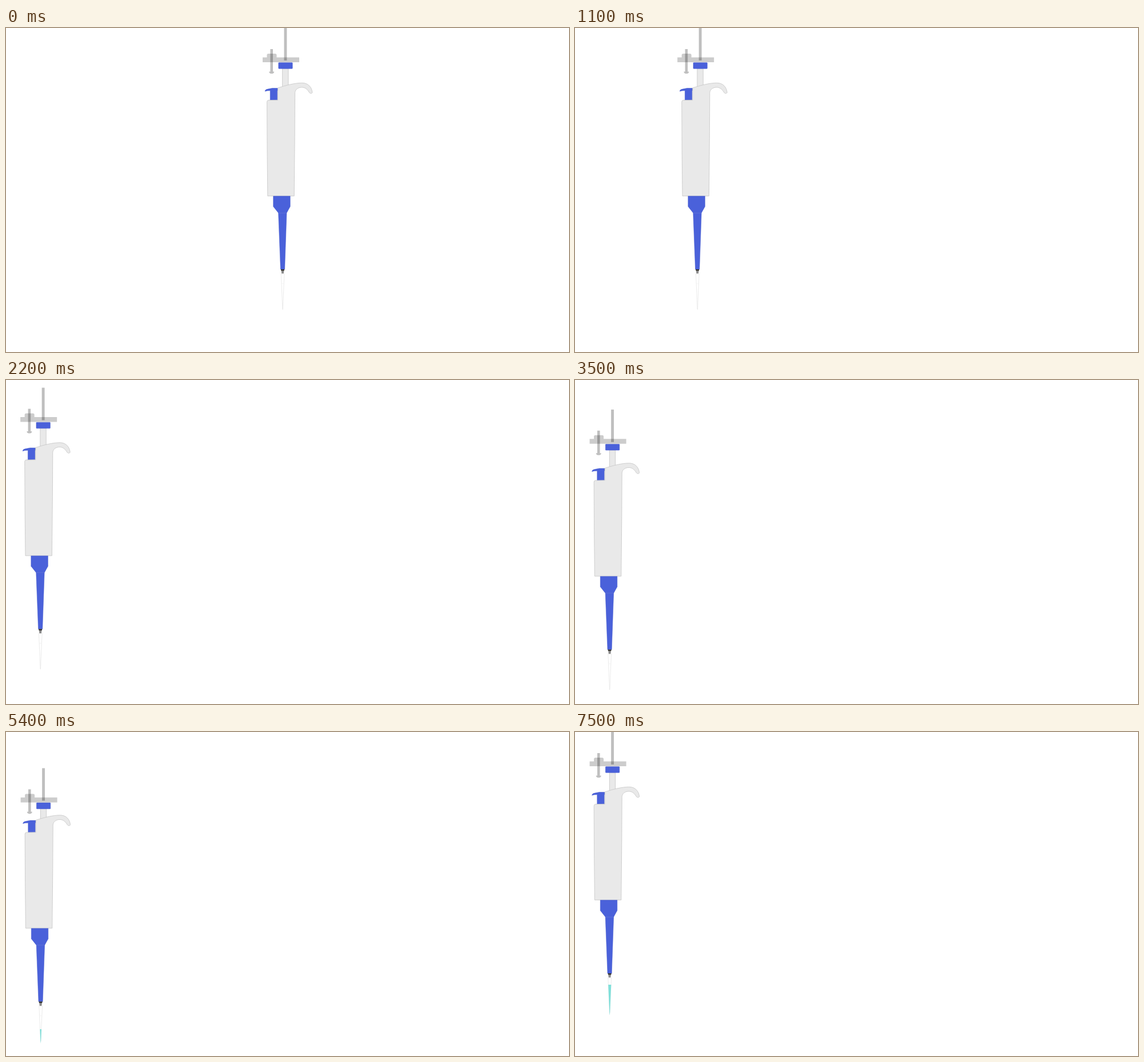
Animation of 985 by 568 pixels, one loop 8 s. Source, as an HTML page:

```html
<!DOCTYPE html>
<html lang="en">
<head>
<meta charset="utf-8">
<title>Pipette</title>
<style>
html, body { margin: 0; width: 100%; height: 100%; overflow: hidden; background: #fff; }
svg { display: block; width: 100%; height: 100%; }
.blue { fill: #4a61da; stroke: #3f55c8; stroke-width: .5; }
.shell { fill: #e9e9e9; stroke: #c6c6c6; stroke-width: .8; }
.plate { fill: #000; fill-opacity: .2; }
.rod { fill: #000; fill-opacity: .25; }
.tip { fill: #fff; fill-opacity: .6; stroke: #e2e2e2; stroke-width: .7; }
</style>
</head>
<body>
<svg viewBox="0 0 985 568">
  <defs>
    <clipPath id="fill"><rect id="level" x="470" y="495.2" width="30" height="60"/></clipPath>
  </defs>
  <g id="pipette">
    <g id="plunger">
      <rect class="shell" x="483.7" y="71" width="10.3" height="38"/>
      <rect class="blue" x="476.8" y="60.7" width="24.4" height="10.6" rx=".8"/>
    </g>
    <path class="blue" d="M453 111 Q453.5 107.6 458 107.1 L466 105.5 H475.8 V109.3 L474.6 110 V126.4 H462.2 V109.8 Q457 109.6 453 111Z"/>
    <path class="shell" d="M456.6 129.5 Q456.7 126.8 459 126.6 L475.6 126.3 V105 C490 100.5 505 96.3 518 96.3 C529 96.3 535 104 536 113 C535.6 115.2 532 115.3 530.6 113 C527 107 523 104 517.5 104 C511 104 505.9 108 505.6 113.5 L505.2 190 L504.2 294.5 H457.8 L457 215Z"/>
    <path class="blue" d="M467.7 294.8 H497.2 V313 L491 324.2 H476.6 L467.7 313Z"/>
    <path class="blue" d="M476.6 324.2 H491 L487.6 423 H480.4Z"/>
    <path d="M476.8 324.2 H490.8" stroke="#6477dc" stroke-width=".7"/>
    <path d="M481.6 425 H486.4 L485.8 430.6 H482.2Z" fill="#8c8c8c"/>
    <path d="M480.8 423 H487.2 L486.6 425.5 H481.4Z" fill="#343434"/>
    <path class="tip" d="M481.2 431 H487 L486.2 448 L484.3 493.4 H483.9 L482 448Z"/>
    <path d="M482 448 H486.2" stroke="#ececec" stroke-width=".6"/>
    <path d="M481.6 443 H486.7 L484.6 490 L484.2 496 H484 L483.6 490Z" fill="#80e0da" clip-path="url(#fill)"/>
    <g id="press">
      <path class="plate" d="M449 51.4 H456.5 V47 Q456.7 45 459 45 H471 Q473.3 45 473.5 47 V51.4 H513 V60 H449Z"/>
      <rect class="rod" x="486.5" y="0" width="4.9" height="57"/>
      <path class="rod" d="M462.4 37 H467 V76.4 H469.2 Q469 79.8 465.5 80 H464 Q460.4 79.8 460.2 76.4 H462.4Z"/>
    </g>
  </g>
</svg>
<script>
const LOOP = 8000, TICK = 100, TICKS = 11;
const get = id => document.getElementById(id);
const pipette = get('pipette'), plunger = get('plunger'), press = get('press'), level = get('level');

// Linear progress of a move whose first visible step falls at `start`.
const progress = (tick, start) => Math.min(1, Math.max(0, (tick - start / TICK + 1) / TICKS));

function draw(time) {
  const tick = Math.floor((time % LOOP) / TICK);
  const slide = progress(tick, 500);
  const lower = progress(tick, 2000);
  const push = progress(tick, 3500);
  const draw = progress(tick, 5000);
  const lift = progress(tick, 6500);

  const x = -424 * slide + 0.6 * lower;
  const y = 49.5 * (lower - lift);
  const shift = `translate(0 ${25.5 * (push - draw)})`;
  pipette.setAttribute('transform', `translate(${x} ${y})`);
  plunger.setAttribute('transform', shift);
  press.setAttribute('transform', shift);
  level.setAttribute('y', draw ? 495.2 - 52.2 * draw : 500);
}

function loop() {
  draw(performance.now());
  requestAnimationFrame(loop);
}
loop();
</script>
</body>
</html>
```
